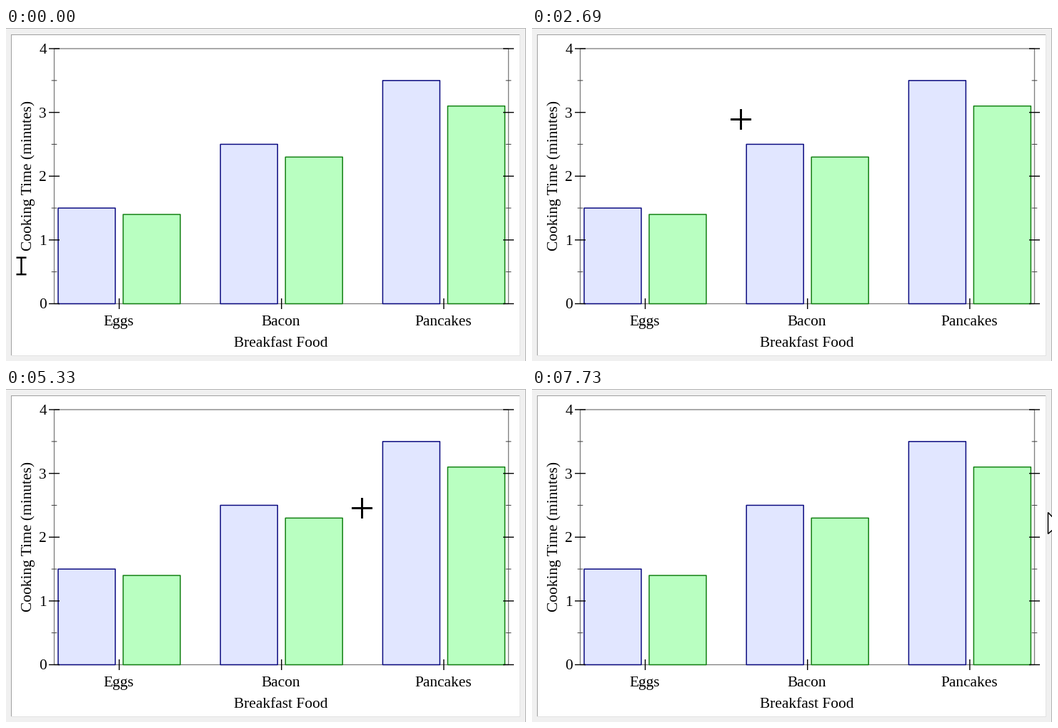
These frames come from a looping animation (728x468 px, 7.81 s). A matplotlib script:

```python
import numpy as np
import matplotlib.pyplot as plt
import matplotlib.patheffects as pe
from matplotlib.animation import FuncAnimation
from matplotlib.patches import Polygon, Rectangle
from matplotlib.path import Path

W, H, DPI = 728, 468, 104
PX = 72 / DPI                      # points per pixel
FRAMES, STEP = 142, 55             # 7810 ms per loop

plt.rcParams.update({"font.family": "Liberation Serif", "path.snap": False,
                     "toolbar": "None"})

fig = plt.figure(figsize=(W / DPI, H / DPI), dpi=DPI, facecolor="#f0f0f0")
ax = fig.add_axes([0, 0, 1, 1])
ax.set(xlim=(0, W), ylim=(H, 0))
ax.axis("off")


def line(xs, ys, color="black", width=1.0, z=1):
    ax.plot(xs, ys, color=color, lw=width * PX, zorder=z, solid_capstyle="butt")


def text(x, y, s, **kw):
    opts = dict(size=21.33 * PX, ha="center", va="baseline", color="black", zorder=5)
    return ax.text(x, y, s, **{**opts, **kw})


def box(x, y, w, h, fill, edge="none", width=0, z=0):
    return ax.add_patch(Rectangle((x, y), w, h, fc=fill, ec=edge,
                                  lw=width * PX, joinstyle="round", zorder=z))


# Window and sunken canvas
line([0, W], [0.5, 0.5], "#b4b4b4")
line([W - 0.5] * 2, [0, H], "#b4b4b4")
box(7, 9, 713, 452, "#e3e3e3")
box(7, 9, 712, 451, "#a0a0a0")
box(8, 10, 711, 450, "white")

# Plot area
LEFT, RIGHT, TOP, BASE = 67.5, 703.5, 29, 387.5
UNIT = (BASE - TOP) / 4


def y_of(v):
    return BASE - v * UNIT


box(LEFT, TOP, RIGHT - LEFT, BASE - TOP, "none", "#808080", 1.33, 1)
for v in np.arange(0, 4.1, 0.5):
    major = v % 1 == 0
    half, color, width = (7.5, "black", 1.4) if major else (3.8, "#404040", 1)
    for x in (LEFT, RIGHT):
        line([x - half, x + half], [y_of(v)] * 2, color, width, 4)
    if major:
        text(57, y_of(v) + 7, f"{v:.0f}", ha="right")

# Bars, each with a negative that shows only under the cursor
FOODS = [("Eggs", 1.5, 1.4), ("Bacon", 2.5, 2.3), ("Pancakes", 3.5, 3.1)]
STYLES = [("#e1e6ff", "#0a0a80"), ("#b9ffc1", "#128012")]
BAR_W = 80


def invert(color):
    return f"#{0xFFFFFF - int(color[1:], 16):06x}"


bars, negatives = [], []
for i, (food, *values) in enumerate(FOODS):
    mid = 158.5 + 227.2 * i
    line([mid, mid], [BASE - 7.5, BASE + 7.5], width=1.4, z=4)
    text(mid - 1, 418, food)
    for x, v, (fill, edge) in zip((mid - 85.5, mid + 5.5), values, STYLES):
        rect = (x, y_of(v), BAR_W, v * UNIT)
        box(*rect, fill, edge, 1.5, 2)
        negatives.append(box(*rect, invert(fill), invert(edge), 1.5, 11))
        bars.append((x, y_of(v), v))

text(385, 448.5, "Breakfast Food")
text(36, 207, "Cooking Time (minutes)", rotation=90, rotation_mode="anchor")


# Cursors, relative to their hot spot
def cross_shape(arm=14.5, w=1.5):
    part = np.array([(-w, -arm), (w, -arm), (w, -w)])
    turn = np.array([(0, 1), (-1, 0)])
    return np.vstack([part @ np.linalg.matrix_power(turn, k) for k in range(4)])


def beam_shape(serif=7, half=13, w=1.2):
    foot = half - 2 * w
    part = np.array([(-serif, -half), (serif, -half), (serif, -foot),
                     (w, -foot), (w, foot), (serif, foot)])
    return np.vstack([part, -part])


CROSS, BEAM = cross_shape(), beam_shape()
ARROW = np.array([(0, 0), (0, 30), (7, 24), (11, 34), (15, 32), (11, 22), (21, 22)])

cursor = ax.add_patch(Polygon(CROSS, fc="black", ec="none", zorder=10))
arrow = ax.add_patch(Polygon(ARROW, fc="white", ec="black", lw=1.5 * PX, zorder=12))
label = text(0, 0, "", size=21.5 * PX, zorder=8,
             path_effects=[pe.withStroke(linewidth=4.5 * PX, foreground="white")])

# Mouse moves: start ms, end ms, goal, upward bow, ease-out power
HOME = np.array([21, 334])
MOVES = [
    (80, 610, (98, 325), 0, 1),
    (1250, 1920, (202, 302), 23, 2.1),
    (2160, 2920, (330, 156), 85, 1),
    (3000, 3320, (345, 202), 0, 1),
    (3850, 4400, (410, 233), 0, 1),
    (4880, 5710, (561, 126), 4, 1.1),
    (6340, 6950, (648, 165), -10, 1.9),
    (7440, 7730, (722, 173), 0, 1),
]
TICK = 76                          # ms between mouse samples


def mouse(t):
    pos = HOME
    for start, end, goal, bow, power in MOVES:
        if t < start:
            break
        n = round((end - start) / TICK)
        k = min(int((t - start) / (end - start) * n), n)
        u = 1 - (1 - k / n) ** power
        pos = pos + u * (np.array(goal) - pos) - (0, 4 * bow * u * (1 - u))
    return np.round(pos)


def value_at(x, y):
    for left, top, v in bars:
        if left <= x <= left + BAR_W and top <= y <= BASE:
            return v
    return None


def update(i):
    x, y = mouse(i * STEP + 64)
    inside = LEFT <= x <= RIGHT
    outside = x > 719
    shape = (CROSS if inside else BEAM) + (x + 0.5, y + 0.5)
    cursor.set_xy(shape)
    cursor.set_visible(not outside)
    arrow.set_xy(ARROW + (x + 0.5, y + 0.5))
    arrow.set_visible(outside)
    for neg in negatives:
        neg.set_clip_path(Path(np.vstack([shape, shape[:1]]), closed=True), ax.transData)
        neg.set_visible(inside)

    v = value_at(x, y)
    label.set_text("" if v is None else f"{v} minutes")
    flip = x > 590                 # no room to the right
    label.set_ha("right" if flip else "left")
    label.set_position((x - 8 if flip else x + 7, y - 8.5))
    return cursor, arrow, label, *negatives


anim = FuncAnimation(fig, update, frames=FRAMES, interval=STEP,
                     repeat=True, repeat_delay=0, blit=False)
plt.show()
```
